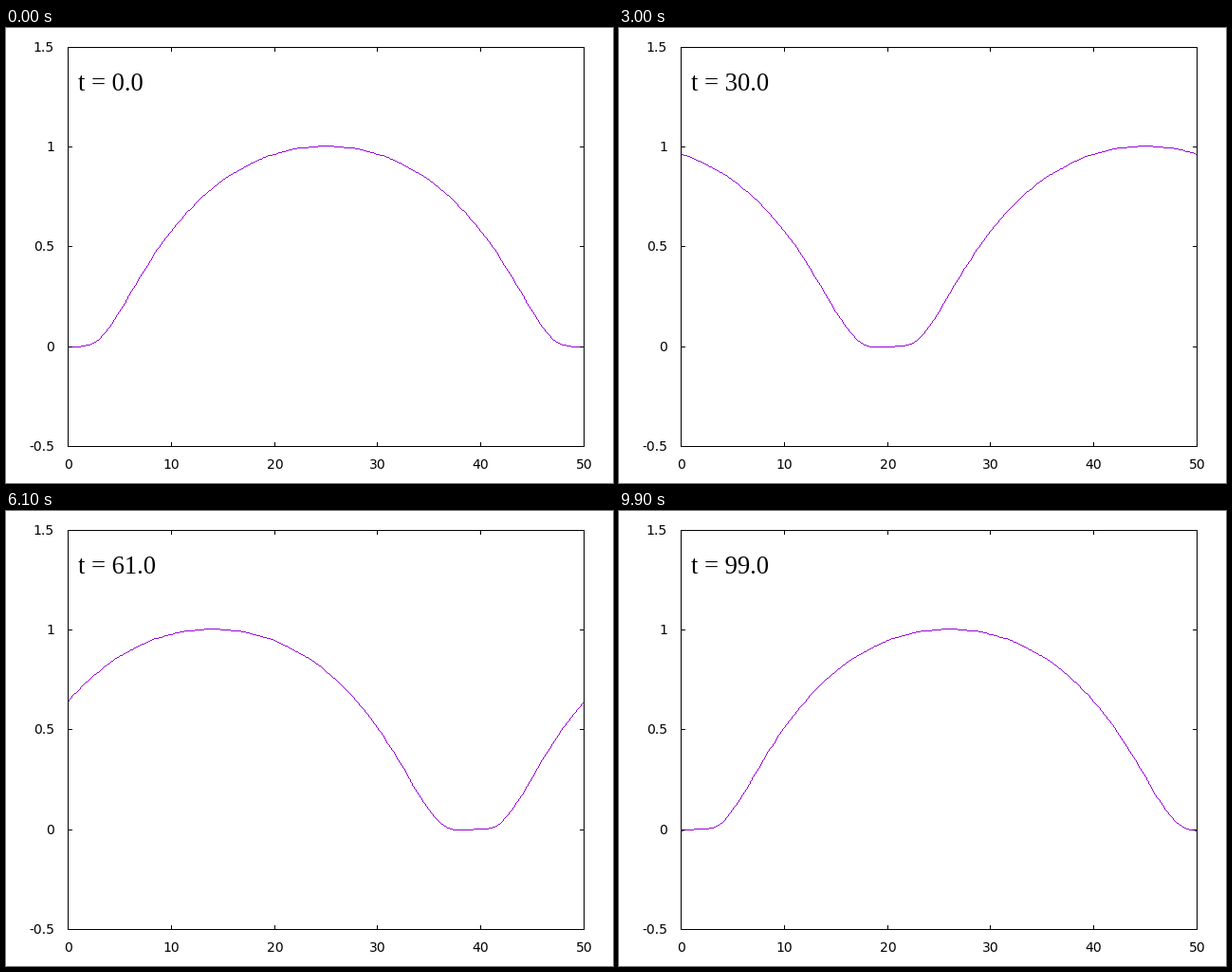
Write a matplotlib script that moves like this. It is 640 by 480 pixels and loops after 10 s.

```python
import numpy as np
import matplotlib.pyplot as plt
from matplotlib.animation import FuncAnimation
from matplotlib.collections import PolyCollection

W, H, DPI = 640, 480, 100
PX = 72 / DPI                      # one pixel in points
LEFT, RIGHT, TOP, BOTTOM = 65, 609, 20, 441
PERIOD, FRAMES = 50, 100
CELL = np.array([[-0.5, -0.5], [0.5, -0.5], [0.5, 0.5], [-0.5, 0.5]])


def px(x):
    return np.round(LEFT + (RIGHT - LEFT) * x / PERIOD)


def py(y):
    return np.round(BOTTOM - (BOTTOM - TOP) * (y + 0.5) / 2)


def wave(x, t):
    """Periodic hump travelling left, with a slight ripple growing at its foot."""
    r = (x + t + PERIOD / 2) % PERIOD - PERIOD / 2
    a = np.abs(r)
    d = PERIOD / 2 - a
    hump = 1.005 - 0.00157 * d**2 - 1.45e-6 * d**4
    soft = 0.12 * np.logaddexp(0, hump / 0.12)
    ripple = 8.2e-5 * t * r * np.exp(-r**2 / 2)
    return soft * (1 - np.exp(-(a / 2.5)**3)) + ripple


def pixels(xs, ys):
    """Whole pixels along a polyline, one per step of each segment's longer axis."""
    parts = []
    for x0, y0, x1, y1 in zip(xs, ys, xs[1:], ys[1:]):
        n = int(max(abs(x1 - x0), abs(y1 - y0))) + 1
        parts.append(np.column_stack([np.linspace(x0, x1, n),
                                      np.linspace(y0, y1, n)]))
    return np.unique(np.round(np.concatenate(parts)), axis=0)


fig = plt.figure(figsize=(W / DPI, H / DPI), dpi=DPI, facecolor="white")
ax = fig.add_axes([0, 0, 1, 1])
ax.set_xlim(-0.5, W - 0.5)
ax.set_ylim(H - 0.5, -0.5)
ax.axis("off")


def stroke(xs, ys):
    ax.plot(xs, ys, color="black", lw=PX, zorder=3, snap=False,
            solid_capstyle="projecting", solid_joinstyle="miter")


def label(x, y, text, align):
    ax.text(x, y, text, ha=align, va="baseline", family="DejaVu Sans",
            fontsize=14 * PX, color="black")


stroke([LEFT, RIGHT, RIGHT, LEFT, LEFT], [TOP, TOP, BOTTOM, BOTTOM, TOP])

for v in range(0, PERIOD + 1, 10):
    x = px(v)
    stroke([x, x], [TOP, TOP + 4])
    stroke([x, x], [BOTTOM, BOTTOM - 4])
    label(x, 464.5, str(v), "center")

for v in (-0.5, 0, 0.5, 1, 1.5):
    y = py(v)
    stroke([LEFT, LEFT + 4], [y, y])
    stroke([RIGHT, RIGHT - 4], [y, y])
    label(50.5, y + 4.5, f"{v:g}", "right")

grid = np.linspace(0, PERIOD, 2 * PERIOD + 1)
curve = PolyCollection([], facecolor="#9400d3", edgecolor="none", lw=0, zorder=2)
curve.set_snap(False)
ax.add_collection(curve, autolim=False)
clock = ax.text(75.5, 65.5, "", ha="left", va="baseline",
                family="Liberation Serif", fontsize=26.67 * PX, color="black")


def update(t):
    dots = pixels(px(grid), py(wave(grid, t)))
    curve.set_verts(dots[:, None, :] + CELL)
    clock.set_text(f"t = {t:.1f}")
    return curve, clock


anim = FuncAnimation(fig, update, frames=FRAMES, interval=100,
                     repeat=True, repeat_delay=0)
plt.show()
```
